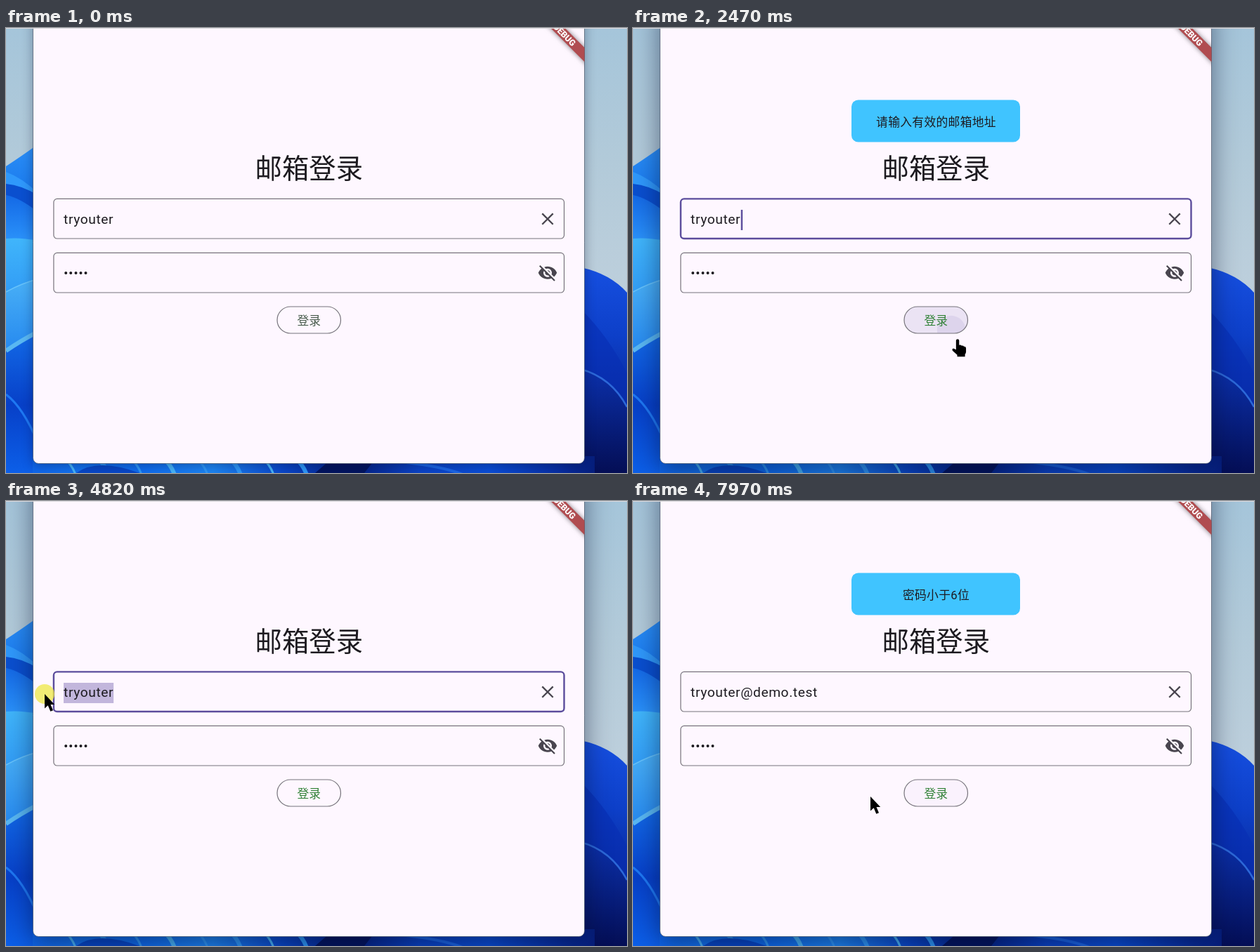
An HTML page with a canvas that plays this animation: 884x634 px, repeating every 8000 ms.

```html
<!DOCTYPE html>
<html lang="zh-CN">
<head>
<meta charset="utf-8">
<title>邮箱登录</title>
<style>
html, body { margin: 0; width: 100%; height: 100%; overflow: hidden; }
canvas { display: block; width: 884px; height: 634px; }
</style>
</head>
<body>
<canvas id="stage" width="884" height="634"></canvas>
<script>
const W = 884, H = 634, LOOP = 8000;
const ctx = document.getElementById('stage').getContext('2d');
const CJK = '"Noto Sans CJK SC", "Noto Sans CJK", sans-serif';
const INK = '#1d1b20', ICON = '#49454f', LINE = '#77747c', ACCENT = '#5b4c9c';
const USER = 'tryouter', MAIL = 'tryouter@demo.test';
const TEXT_X = 82;

const BUTTON = { x: 386, y: 397, w: 90.5, h: 38 };
const BUTTON_HIT = { x: 386, y: 397, w: 92, h: 48 };
const EMAIL = { x: 67.9, y: 243.4, w: 726.6, h: 56.6 };
const PASSWORD = { x: 67.9, y: 320.4, w: 726.6, h: 56.6 };

// Pointer path: time, x, y
const PATH = [
  [720, 783, 632], [1000, 716, 598], [1350, 615, 543], [1490, 540, 503],
  [2060, 455, 427], [2330, 455, 427], [2470, 462, 443], [2930, 489, 540],
  [3500, 489, 540], [4330, 210, 278], [4440, 210, 278], [4820, 55, 275],
  [5880, 55, 275], [6080, 449, 334], [6500, 472, 412], [6690, 468, 419],
  [6820, 458, 420], [7220, 458, 420], [7700, 632, 488], [7790, 632, 488],
  [7970, 338, 421]
];
const EYE_OFF = new Path2D('M12 7c2.76 0 5 2.24 5 5 0 .65-.13 1.26-.36 1.83l2.92 2.92c1.51-1.26 2.7-2.89 3.43-4.75-1.73-4.39-6-7.5-11-7.5-1.4 0-2.74.25-3.98.7l2.16 2.16C10.74 7.13 11.35 7 12 7zM2 4.27l2.74 2.74C3.08 8.3 1.78 10.02 1 12c1.73 4.39 6 7.5 11 7.5 1.55 0 3.03-.3 4.38-.84L19.73 22 21 20.73 3.27 3zM7.53 9.8l1.55 1.55c-.05.21-.08.43-.08.65 0 1.66 1.34 3 3 3 .22 0 .44-.03.65-.08l1.55 1.55c-.67.33-1.41.53-2.2.53-2.76 0-5-2.24-5-5 0-.79.2-1.53.53-2.2zm4.31-.78l3.15 3.15.02-.16c0-1.66-1.34-3-3-3z');
const ARROW = new Path2D('M0 0V20.5L4.7 16.3 8.3 24.8 12 23.2 8.5 15H14.2Z');
const HAND = new Path2D('M-2.2 2Q-2 0 0 0Q2 0 2.2 2V8.5Q4.5 7.8 5.6 9.4Q8 8.8 9 10.6Q12 10.4 12 13.5V18Q12 20 10.5 22V25H-.5V22.5L-7.2 16.5Q-8.3 14 -6 13.4L-2.2 15Z');

const clamp = v => Math.max(0, Math.min(1, v));
const ramp = (t, a, b) => clamp((t - a) / (b - a));
const within = (t, a, b) => t >= a && t < b;
const inside = (p, r) => p.x >= r.x && p.x <= r.x + r.w && p.y >= r.y && p.y <= r.y + r.h;

function pointerAt(t) {
  if (t < PATH[0][0]) return { x: -99, y: -99 };
  const i = PATH.findIndex(k => k[0] > t);
  if (i < 0) return { x: 338, y: 421 };
  const [t0, x0, y0] = PATH[i - 1], [t1, x1, y1] = PATH[i];
  const k = (t - t0) / (t1 - t0);
  return { x: x0 + (x1 - x0) * k, y: y0 + (y1 - y0) * k };
}

// Hover strength eased over the last 120 ms
function hoverAt(t, rect) {
  let sum = 0;
  for (let d = 0; d < 120; d += 20) sum += inside(pointerAt(t - d), rect);
  return sum / 6;
}

function roundRect(r, radius) {
  ctx.beginPath();
  ctx.roundRect(r.x, r.y, r.w, r.h, radius);
}

function label(str, x, y, font, color, align = 'left', spacing = 0) {
  ctx.font = font;
  ctx.letterSpacing = spacing + 'px';
  ctx.textAlign = align;
  ctx.fillStyle = color;
  ctx.fillText(str, x, y);
}

function fieldFont() {
  ctx.font = '19.2px Roboto, sans-serif';
  ctx.letterSpacing = '0.6px';
}

function makeWallpaper() {
  const cv = document.createElement('canvas');
  cv.width = W; cv.height = H;
  const c = cv.getContext('2d');
  const grad = (y0, y1, ...cols) => {
    const g = c.createLinearGradient(0, y0, 0, y1);
    cols.forEach((col, i) => g.addColorStop(i / (cols.length - 1), col));
    return g;
  };
  const shape = (d, fill) => { c.fillStyle = fill; c.fill(new Path2D(d)); };
  const streak = (d, color, width) => {
    c.strokeStyle = color; c.lineWidth = width; c.stroke(new Path2D(d));
  };
  c.fillStyle = grad(0, 380, '#a5c5da', '#b2cad9', '#bdcfdc');
  c.fillRect(0, 0, W, H);

  // Left petals
  shape('M0 197Q20 184 45 166V634H0Z', grad(170, 240, '#2a8df6', '#1878ec'));
  shape('M0 205Q24 214 45 235V255L0 222Z', '#2f98fb');
  shape('M0 222Q22 224 45 238V262L0 246Z', '#0a4fcf');
  shape('M0 238Q20 242 45 262V305H0Z', grad(238, 305, '#1469e6', '#2b93fa'));
  shape('M0 300Q20 298 45 303V400H0Z', grad(300, 380, '#40b5fb', '#319bf5'));
  shape('M0 375Q24 362 45 357V440L0 468Z', grad(360, 460, '#48aff6', '#2689ef'));
  shape('M0 460L45 430V634H0Z', grad(440, 634, '#1268e6', '#0740c8', '#0c5fe8'));
  streak('M0 376Q24 363 45 358', '#67c3fb', 1.5);
  streak('M0 460Q20 446 45 433', '#59b7f2', 6);
  streak('M0 522Q24 540 45 590', '#1e78f2', 3);

  // Right petals
  shape('M818 341Q860 350 884 377V634H818Z', grad(343, 634, '#164fe0', '#0d3fc8', '#0a2998', '#051160'));
  shape('M818 400Q858 440 884 492V560Q850 500 818 486Z', 'rgba(8,45,180,.6)');
  shape('M818 486Q862 498 884 540V634H818Z', grad(490, 634, '#0b2fa8', '#040e55'));
  streak('M818 486Q862 498 884 540', '#2c68d8', 2.5);

  // Lower edge
  const g = c.createLinearGradient(0, 0, W, 0);
  ['#0c5fe8', '#1372ef', '#0f6df0', '#1d86f4', '#0a48cc', '#041f80', '#0b44c8', '#0a4ed8', '#082fa4', '#040f58']
    .forEach((col, i) => g.addColorStop(i / 9, col));
  c.fillStyle = g;
  c.fillRect(38, 610, 800, 24);
  for (let i = 0; i < 9; i++) {
    const x = 82 + i * 47;
    streak(`M${x} 612Q${x + 14} 624 ${x + 18} 640`, i % 3 ? '#2f99fa' : '#49b7fb', 3 + i % 2 * 3);
  }
  shape('M100 634Q130 612 190 634Z', '#0848c8');
  shape('M440 634L462 615H525L510 634Z', '#03155f');
  streak('M560 618Q620 624 650 636', '#1c67e8', 4);
  return cv;
}
const wallpaper = makeWallpaper();

function drawWindow(t) {
  const active = t >= 2400;
  ctx.drawImage(wallpaper, 0, 0);
  ctx.save();
  ctx.shadowColor = active ? 'rgba(0,10,40,.5)' : 'rgba(0,10,40,.35)';
  ctx.shadowBlur = active ? 36 : 16;
  ctx.shadowOffsetY = active ? 10 : 3;
  roundRect({ x: 38.5, y: -40, w: 785, h: 660.5 }, 8);
  ctx.fillStyle = '#fef7ff';
  ctx.fill();
  ctx.restore();
  ctx.strokeStyle = 'rgba(60,75,95,.65)';
  ctx.lineWidth = 1;
  ctx.stroke();

  ctx.save();
  ctx.clip();
  ctx.translate(795.2, 9.8);
  ctx.rotate(Math.PI / 4);
  ctx.shadowColor = 'rgba(0,0,0,.5)';
  ctx.shadowBlur = 7;
  ctx.fillStyle = '#b04c50';
  ctx.fillRect(-60, -7.2, 120, 14.4);
  ctx.shadowColor = 'transparent';
  label('DEBUG', 0, 4.4, '900 12.2px Roboto, sans-serif', '#fff', 'center');
  ctx.restore();

  ctx.fillStyle = '#dcdade';
  ctx.fillRect(0, 0, W, 1);
}

function drawField(rect, focused, hover) {
  roundRect(rect, 4.8);
  ctx.strokeStyle = focused ? ACCENT : hover > 0.5 ? '#55535a' : LINE;
  ctx.lineWidth = focused ? 2.4 : 1.2;
  ctx.stroke();
}

function drawEmail(t) {
  const focused = within(t, 2400, 7260);
  const str = t < 5680 ? USER : MAIL;
  drawField(EMAIL, focused, hoverAt(t, EMAIL));
  fieldFont();
  const end = TEXT_X + ctx.measureText(str).width;

  if (within(t, 4470, 5680)) {
    const px = pointerAt(t).x;
    let n = 0;
    while (n < str.length && TEXT_X + ctx.measureText(str.slice(0, n)).width < px) n++;
    const from = TEXT_X + ctx.measureText(str.slice(0, n)).width;
    ctx.fillStyle = '#c2b6dc';
    ctx.fillRect(from, 259, end - from, 29);
  } else if (focused) {
    const since = t < 5680 ? t - 2330 : t < 7150 ? t - 5680 : 500;
    if (Math.floor(since / 500) % 2 === 0) {
      ctx.fillStyle = ACCENT;
      ctx.fillRect(end + 0.5, 259, 2.4, 29);
    }
  }
  label(str, TEXT_X, 279.3, '19.2px Roboto, sans-serif', INK, 'left', 0.6);

  ctx.strokeStyle = ICON;
  ctx.lineWidth = 2.3;
  ctx.beginPath();
  ctx.moveTo(763.3, 264.4); ctx.lineTo(778.7, 279.8);
  ctx.moveTo(778.7, 264.4); ctx.lineTo(763.3, 279.8);
  ctx.stroke();
}

function drawPassword(t) {
  drawField(PASSWORD, false, hoverAt(t, PASSWORD));
  label('•••••', TEXT_X, 356.2, '19.2px Roboto, sans-serif', INK, 'left', 0.6);
  ctx.save();
  ctx.translate(756.6, 334.4);
  ctx.scale(1.2, 1.2);
  ctx.fillStyle = ICON;
  ctx.fill(EYE_OFF);
  ctx.restore();
}

function drawRipple(t, start, x, y) {
  if (!within(t, start, start + 450)) return;
  const fade = 1 - ramp(t, start + 200, start + 450);
  ctx.fillStyle = `rgba(103,80,164,${0.1 * fade})`;
  ctx.beginPath();
  ctx.arc(x, y, 8 + 90 * ramp(t, start, start + 600), 0, 7);
  ctx.fill();
}

function drawButton(t) {
  const hover = hoverAt(t, BUTTON_HIT);
  ctx.save();
  roundRect(BUTTON, 19);
  ctx.clip();
  ctx.fillStyle = `rgba(103,80,164,${hover * (within(t, 2400, 2700) ? 0.12 : 0.08)})`;
  ctx.fillRect(BUTTON.x, BUTTON.y, BUTTON.w, BUTTON.h);
  drawRipple(t, 2390, 453, 430);
  drawRipple(t, 7210, 458, 420);
  ctx.restore();
  roundRect(BUTTON, 19);
  ctx.strokeStyle = LINE;
  ctx.lineWidth = 1.2;
  ctx.stroke();
  label('登录', 431.3, 423.3, '16.8px ' + CJK, t < 2000 ? '#4a5d4e' : '#328238', 'center');
}

function drawToast(t, str, fadeIn, fadeOut) {
  const alpha = ramp(t, fadeIn, fadeIn + 70) * (1 - ramp(t, fadeOut, fadeOut + 180));
  if (!alpha) return;
  ctx.save();
  ctx.globalAlpha = alpha;
  roundRect({ x: 311, y: 102.5, w: 240, h: 60 }, 9.6);
  ctx.fillStyle = '#40c4ff';
  ctx.fill();
  label(str, 431.5, 140, '16.8px Roboto, ' + CJK, INK, 'center', 0.3);
  ctx.restore();
}

function drawPress(t, p) {
  const alpha = Math.max(
    within(t, 2330, 2400) ? 1 : 0,
    within(t, 4460, 5130) ? 1 - 0.5 * ramp(t, 5000, 5010) : 0,
    within(t, 7150, 7230) ? 1 : 0
  );
  if (!alpha) return;
  ctx.fillStyle = `rgba(238,232,70,${0.75 * alpha})`;
  ctx.beginPath();
  ctx.arc(p.x, p.y, 14, 0, 7);
  ctx.fill();
}

function drawPointer(p) {
  ctx.save();
  ctx.translate(p.x, p.y);
  ctx.fillStyle = '#000';
  if (inside(p, EMAIL) || inside(p, PASSWORD)) {
    ctx.fillRect(-1.2, -10, 2.4, 20);
    for (const y of [-11.5, 9.3]) {
      ctx.fillRect(-4, y, 3.4, 2.2);
      ctx.fillRect(0.6, y, 3.4, 2.2);
    }
  } else {
    ctx.fill(inside(p, BUTTON_HIT) ? HAND : ARROW);
  }
  ctx.restore();
}

function draw(t) {
  const p = pointerAt(t);
  drawWindow(t);
  label('邮箱登录', 431.3, 213.6, '38.4px ' + CJK, INK, 'center');
  drawEmail(t);
  drawPassword(t);
  drawButton(t);
  drawToast(t, '请输入有效的邮箱地址', 2390, 4600);
  drawToast(t, '密码小于6位', 7230, 9000);
  drawPress(t, p);
  drawPointer(p);
}

const start = performance.now();
function tick() {
  draw((performance.now() - start) % LOOP);
  requestAnimationFrame(tick);
}
tick();
</script>
</body>
</html>
```
